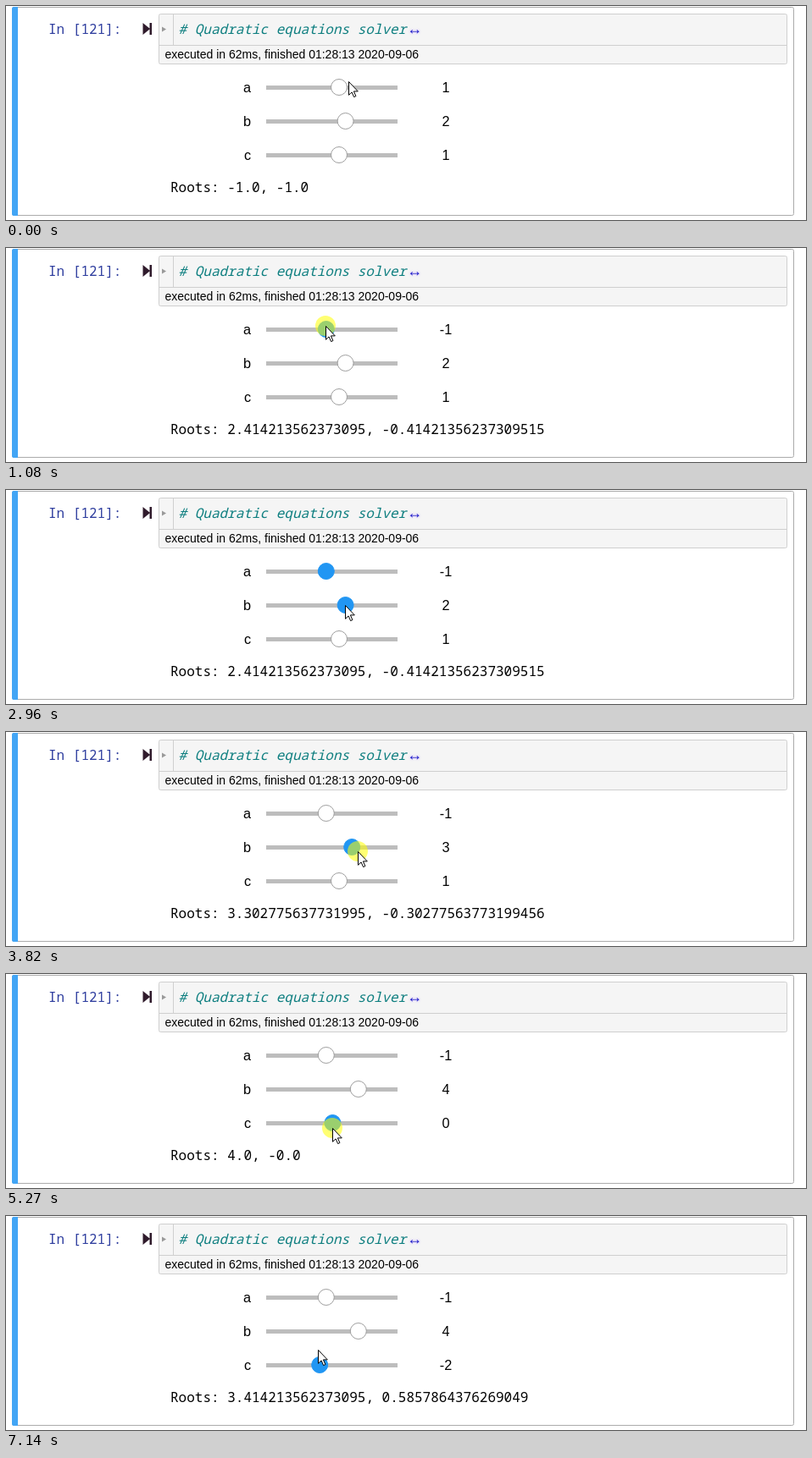
Recreate the animation shown at these times as an HTML page. Size 944x253 px, loop 8000 ms.

```html
<!DOCTYPE html>
<html lang="en">
<head>
<meta charset="utf-8">
<title>Quadratic equations solver</title>
<style>
  html, body { margin: 0; width: 100%; height: 100%; overflow: hidden; background: #fff; }
  svg { display: block; width: 944px; height: 253px; }
  text { white-space: pre; }
  .mono { font: 16px "Noto Sans Mono", monospace; }
  .sans { font: 16.25px "Liberation Sans", Arial, sans-serif; }
  .time { font-size: 14px; }
  .prompt { fill: #303f9f; }
  .comment { fill: #0f7f80; font-style: italic; }
  .fold { fill: #2020c8; font-size: 18px; filter: drop-shadow(0 0 1.5px #b9f); }
  .track { fill: #bdbdbd; }
  .knob { fill: #fff; stroke: #9e9e9e; }
  .knob.on { fill: #2196f3; stroke: #2196f3; }
</style>
</head>
<body>
<svg viewBox="0 0 944 253">
  <rect x="7.5" y="1.5" width="922" height="246" rx="2" fill="#fff" stroke="#ababab"/>
  <path d="M14 1H9a2 2 0 0 0-2 2V246a2 2 0 0 0 2 2H14Z" fill="#42a5f5"/>

  <text class="mono prompt" x="50" y="33">In [121]:</text>
  <path d="M161.5 20 170 27 161.5 34ZM169.5 20H172V34H169.5Z" fill="#2f1a2b"/>

  <rect x="180.5" y="9.5" width="741" height="59" rx="2" fill="#f5f5f5" stroke="#cfcfcf"/>
  <path d="M197.5 10V46M181 46.5H921" stroke="#cfcfcf"/>
  <path d="M184 24.5 189 27.5 184 30.5Z" fill="#999"/>
  <text class="mono comment" x="203.5" y="33"># Quadratic equations solver</text>
  <text class="sans fold" x="473" y="33">↔</text>
  <text class="sans time" x="187.5" y="62">executed in 62ms, finished 01:28:13 2020-09-06</text>

  <g id="rows"></g>
  <text id="roots" class="mono" x="194" y="220"></text>

  <circle id="press" r="12" fill="#ff0"/>
  <path id="arrow" d="M.5.5V16.3L4.1 12.9 6.6 18.6 8.9 17.6 6.4 11.9H11.3Z" fill="#fff" stroke="#000"/>
</svg>
<script>
const LOOP = 8000;

// start, end, steps, target x, target y
const moves = [
  [80, 470, 6, 393, 94],
  [700, 700, 1, 386, 94],
  [770, 770, 1, 380, 94],
  [930, 930, 1, 383, 93],
  [1000, 1080, 2, 377, 92],
  [2400, 2960, 8, 400, 136],
  [3120, 3210, 2, 401, 139],
  [3520, 3660, 3, 412, 139],
  [3820, 3820, 1, 415, 141],
  [3900, 4040, 2, 417, 141],
  [4750, 4900, 3, 388, 183],
  [5120, 5660, 8, 367, 178],
  [6350, 6350, 1, 367, 176],
  [7140, 7140, 1, 368, 158]
];

// time, value pairs
const sliders = [
  [[0, 1], [700, 0], [770, -1], [930, 0], [1000, -1]],
  [[0, 2], [3590, 3], [3900, 4]],
  [[0, 1], [5197, 0], [5351, -1], [5506, -2]]
];
const focus = [[0, -1], [470, 0], [3120, 1], [4980, 2]];
const glow = [
  [0, 0], [470, .55], [1860, .28], [1940, 0],
  [3120, .28], [3210, .55], [4520, .28], [4590, 0],
  [4980, .55], [6350, 0]
];

const byId = id => document.getElementById(id);
const at = (list, t) => list.filter(([start]) => start <= t).pop()[1];
const knobX = v => 385.4 + 7.6 * v;
const rowY = i => 96 + 40 * i;

byId('rows').innerHTML = [...'abc'].map((name, i) => `
  <text class="sans" x="289" y="${rowY(i) + 6}" text-anchor="end">${name}</text>
  <rect class="track" x="307" y="${rowY(i) - 2}" width="155" height="5"/>
  <circle class="knob" cy="${rowY(i)}" r="9.5"/>
  <text class="sans value" x="519" y="${rowY(i) + 6}" text-anchor="middle"></text>`).join('');
const knobs = document.querySelectorAll('.knob');
const values = document.querySelectorAll('.value');

function pointer(t) {
  let x = 404, y = 89;
  for (const [start, end, steps, tx, ty] of moves) {
    if (t < start) break;
    const gap = (end - start) / (steps - 1 || 1);
    const done = t >= end ? 1 : (Math.floor((t - start) / gap) + 1) / steps;
    const ease = done * done * (3 - 2 * done);
    x += (tx - x) * ease;
    y += (ty - y) * ease;
  }
  return [Math.round(x), Math.round(y)];
}

function float(n) {
  if (!Number.isInteger(n)) return String(n);
  return (Object.is(n, -0) ? '-' : '') + n + '.0';
}

function solve(a, b, c) {
  if (!a) return '';
  const d = Math.sqrt(b * b - 4 * a * c);
  return `Roots: ${float((-b - d) / (2 * a))}, ${float((-b + d) / (2 * a))}`;
}

function draw(t) {
  const [x, y] = pointer(t);
  const nums = sliders.map(s => at(s, t));
  const active = at(focus, t), alpha = at(glow, t);
  nums.forEach((v, i) => {
    const hover = !alpha && Math.hypot(x - knobX(v), y - rowY(i)) < 10;
    knobs[i].setAttribute('cx', knobX(v));
    knobs[i].classList.toggle('on', i === active || hover);
    values[i].textContent = v;
  });
  byId('roots').textContent = solve(...nums);
  const place = `translate(${x} ${y})`;
  byId('press').setAttribute('transform', place);
  byId('press').setAttribute('opacity', alpha);
  byId('arrow').setAttribute('transform', place);
}

const origin = performance.now();
function tick() {
  draw((performance.now() - origin) % LOOP);
  requestAnimationFrame(tick);
}
tick();
</script>
</body>
</html>
```
